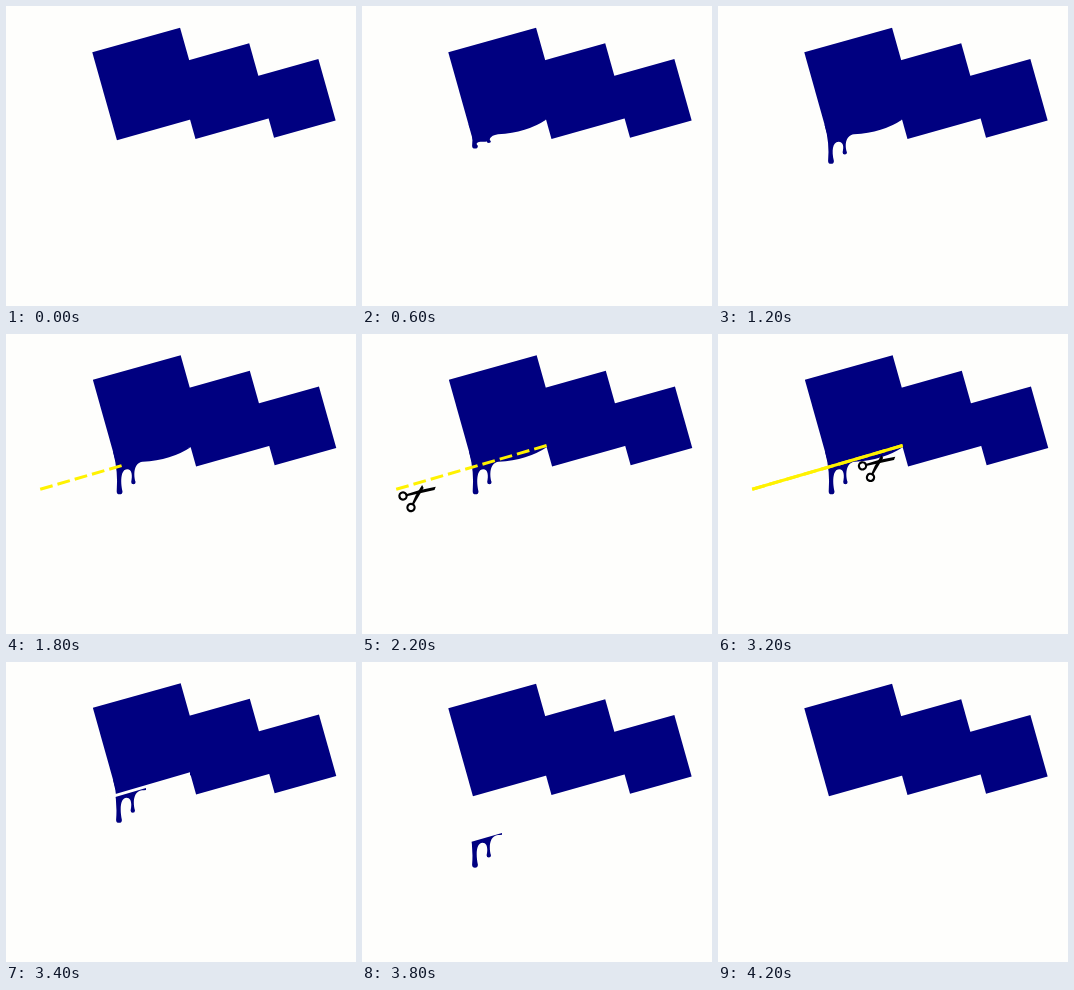
These frames come from a looping animation (350x300 px, 4400 ms). An HTML page with a canvas:

```html
<!DOCTYPE html>
<html lang="en">
<head>
<meta charset="utf-8">
<title>Dripping squares</title>
<style>
html, body { margin: 0; width: 100%; height: 100%; overflow: hidden; background: #fefefc; }
canvas { display: block; }
</style>
</head>
<body>
<canvas id="stage" width="350" height="300"></canvas>
<script>
const ctx = document.getElementById('stage').getContext('2d');
const PAPER = '#fefefc', NAVY = '#000080', YELLOW = '#fff200';
const STEP = 200, STEPS = 22;
const MELTED = 7, MARK = 8, SCISSORS = 11, CUT = 14, FALL = 17, GONE = 21;

// Cut line, measured along x
const LEFT = 34.2, PERIOD = 17.25, DASH = 12.4, DASHES = 9, SLOPE = -0.291;
const lineY = x => 155.3 + SLOPE * (x - LEFT);
const dashEnd = count => LEFT + PERIOD * (count - 1) + DASH;

const ease = k => (1 - Math.cos(Math.PI * k)) / 2;

function drawSquares() {
  ctx.fillStyle = NAVY;
  for (let i = 0; i < 3; i++) {
    const side = 91.2 - 13.6 * i;
    ctx.save();
    ctx.translate(142.5 + 73.85 * i, 77.9 + 7.25 * i);
    ctx.rotate(-15.7 * Math.PI / 180);
    ctx.fillRect(-side / 2, -side / 2, side, side);
    ctx.restore();
  }
}

// Sagging lower edge of the first square with two growing drips
function drawGoo(step) {
  const grow = ease(step / 8), sag = Math.min(1, step / 3);
  const arch = 131.4 + 4.4 * sag;
  const y1 = 131 + 28 * grow, y2 = 128.3 + 21 * grow;
  const mid1 = (y1 + arch) / 2, mid2 = (y2 + arch) / 2;
  ctx.beginPath();
  ctx.moveTo(106.5, 118.5);
  ctx.quadraticCurveTo(111.7, (y1 + 118) / 2, 110.1, y1);
  ctx.arc(113, y1, 2.9, Math.PI, 0, true);
  ctx.bezierCurveTo(113.5, mid1, 114.5, arch, 120.5, arch);
  ctx.bezierCurveTo(125.5, arch, 126, mid2, 124.6, y2);
  ctx.arc(126.8, y2, 2.2, Math.PI, 0, true);
  ctx.bezierCurveTo(127, mid2, 126.5, 129.5, 136, 127 + 1.2 * sag);
  ctx.quadraticCurveTo(165, 119 + 7.5 * sag, 184, 113.7);
  ctx.fillStyle = NAVY;
  ctx.fill();
}

// Area under the cut line, leaving a gap of the line's width
function traceBelow(offset, right) {
  ctx.beginPath();
  ctx.moveTo(100, lineY(100) + offset);
  ctx.lineTo(right, lineY(right) + offset);
  ctx.lineTo(right, 180);
  ctx.lineTo(100, 180);
}

function drawDrop(dy) {
  ctx.save();
  ctx.translate(0, dy);
  traceBelow(1.5, 140);
  ctx.clip();
  drawGoo(MELTED);
  ctx.restore();
}

function drawLine(right, dashed) {
  const length = Math.hypot(1, SLOPE);
  ctx.setLineDash(dashed ? [DASH * length, (PERIOD - DASH) * length] : []);
  ctx.strokeStyle = YELLOW;
  ctx.lineWidth = 3;
  ctx.beginPath();
  ctx.moveTo(LEFT, lineY(LEFT));
  ctx.lineTo(right, lineY(right));
  ctx.stroke();
  ctx.setLineDash([]);
}

function drawBlade(x, y, tipX, tipY) {
  const angle = Math.atan2(tipY - y, tipX - x), length = Math.hypot(tipX - x, tipY - y);
  ctx.save();
  ctx.translate(x, y);
  ctx.rotate(angle);
  ctx.beginPath();
  ctx.arc(0, 0, 3.6, 0, 2 * Math.PI);
  ctx.lineWidth = 2.2;
  ctx.strokeStyle = ctx.fillStyle = '#000';
  ctx.stroke();
  ctx.beginPath();
  ctx.moveTo(3.5, -1);
  ctx.lineTo(length * 0.5, -1.8);
  ctx.lineTo(length, -1);
  ctx.lineTo(length - 2, 1.8);
  ctx.lineTo(3.5, 1);
  ctx.fill();
  ctx.restore();
}

function drawScissors(dx) {
  ctx.save();
  ctx.translate(dx, SLOPE * dx);
  drawBlade(41, 162, 74, 153.8);
  drawBlade(49, 173.5, 61, 151.5);
  ctx.restore();
}

function draw(step) {
  ctx.fillStyle = PAPER;
  ctx.fillRect(0, 0, 350, 300);

  ctx.save();
  if (step >= MELTED && step <= FALL) ctx.translate(0.6, -0.5);
  drawSquares();
  if (step > 0 && step <= FALL) drawGoo(Math.min(step, MELTED));
  ctx.restore();

  if (step === FALL) {
    traceBelow(-1.5, 184);
    ctx.fillStyle = PAPER;
    ctx.fill();
  }
  if (step >= FALL && step < GONE) drawDrop(8.5 * (step - FALL) ** 2.4);

  if (step >= MARK && step < FALL) {
    const count = Math.min(DASHES, Math.floor(2.5 * (step - MARK + 1)));
    drawLine(dashEnd(count), true);
    const cuts = Math.max(0, step - CUT + 1);
    if (cuts) drawLine(dashEnd(3 * cuts), false);
    if (step >= SCISSORS) drawScissors(3 * PERIOD * Math.max(0, cuts - 1));
  }
}

function tick() {
  draw(Math.floor(performance.now() / STEP) % STEPS);
  requestAnimationFrame(tick);
}
tick();
</script>
</body>
</html>
```
